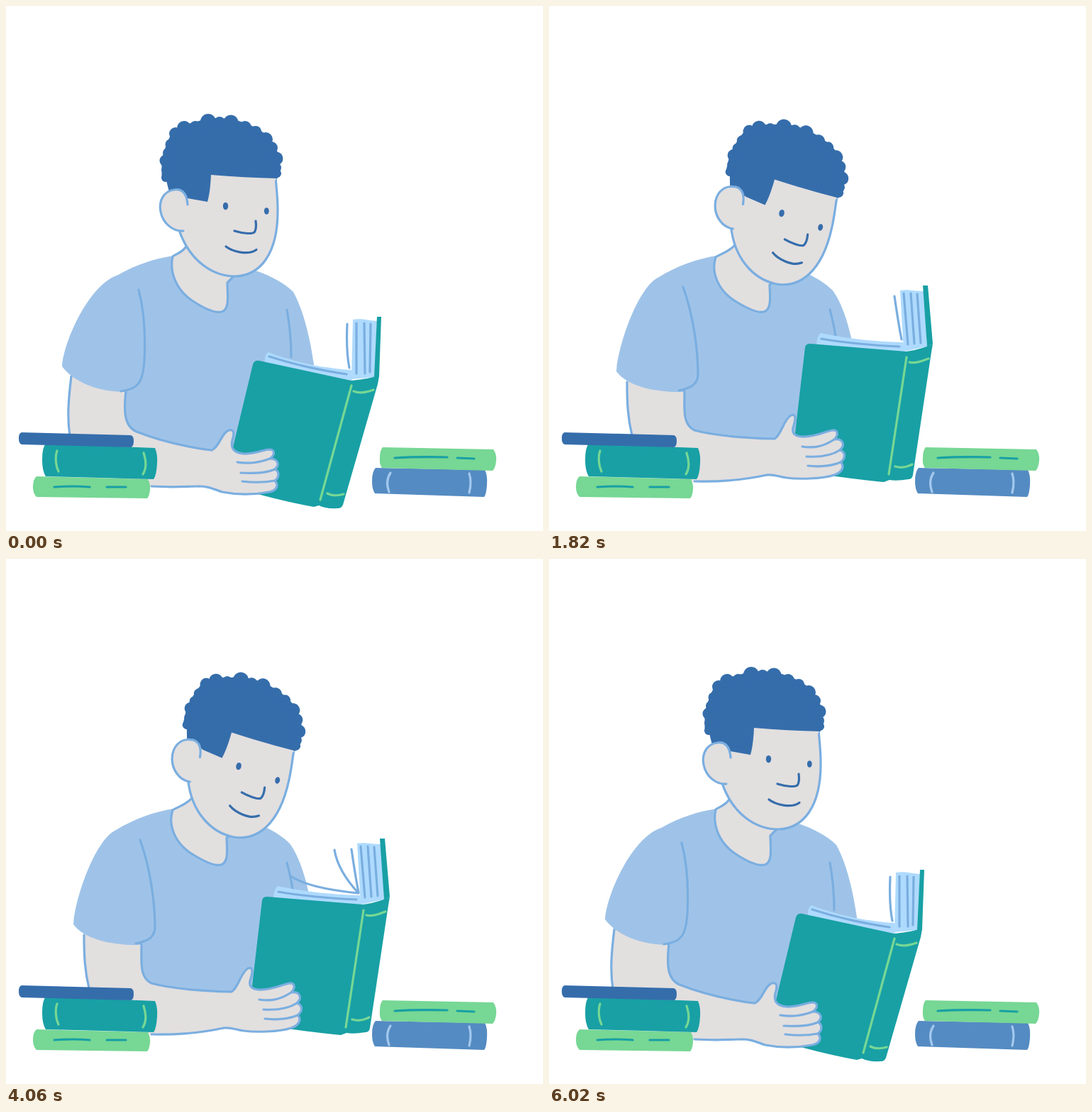
Animation of 757 by 740 pixels, one loop 6300 ms. Source, as an HTML page:

```html
<!DOCTYPE html>
<html lang="en">
<head>
<meta charset="utf-8">
<title>Reader</title>
<style>
html, body { margin: 0; width: 100%; height: 100%; overflow: hidden; background: #fff; }
svg { display: block; width: 757px; height: 740px; fill: none; stroke-width: 3.2; stroke-linecap: round; stroke-linejoin: round; }
.skin { fill: #e2dfdf; }
.shirt { fill: #9fc3e8; }
.hair { fill: #356dab; }
.teal { fill: #18a0a5; }
.green { fill: #77d794; }
.blue { fill: #548bc2; }
.page { fill: #aedafd; }
.line { stroke: #7aaee0; }
.dark { stroke: #356dab; }
.tealLine { stroke: #18a0a5; }
.greenLine { stroke: #77d794; }
.paleLine { stroke: #a3c8ee; }
</style>
</head>
<body>
<!-- d is the upright pose, data-to the leaning pose -->
<svg viewBox="0 0 757 740">
  <g id="arm">
    <path class="skin" d="M92 520C88 555 86 580 92 615C110 650 150 674 212 677C240 679 255 677 272 677L310 685L325 610L180 520Z"
      data-to="M110 526C110 560 110 580 117 605C130 650 170 670 212 670C245 671 275 668 307 661L340 663L345 596L200 520Z"/>
    <path class="line" d="M92 522C88 555 86 580 90 606M205 677C240 679 255 677 272 677"
      data-to="M110 530C110 560 111 580 117 605M205 670C245 671 275 668 307 661"/>
  </g>
  <g id="shirt">
    <path class="shirt" d="M236 352C210 356 184 364 158 379C118 392 82 470 79 508C95 530 130 544 168 544C166 570 166 592 184 600C220 614 262 623 300 627L400 620L434 505C429 470 420 430 405 403C392 390 372 380 355 374Z"
      data-to="M236 352C210 356 181 366 155 382C125 396 97 480 95 515C110 536 150 545 190 544C191 568 188 590 205 598C235 606 275 609 318 610L400 600L427 472C420 440 412 418 400 401C390 391 378 384 366 378Z"/>
    <path class="line" d="M187 400C195 430 197 460 195 500C193 530 187 540 162 543M169 543C166 570 166 592 184 600C220 614 262 623 297 627M396 428C400 450 402 475 402 495"
      data-to="M189 396C205 440 210 490 210 520C209 532 203 538 183 542M191 543C191 568 188 590 205 598C235 606 275 609 318 610M396 428C399 440 403 455 404 467"/>
    <path class="skin line" d="M254 339C248 348 240 349 235 353C230 375 240 400 262 415C280 427 295 433 304 431C316 428 312 405 312 390L320 382"
      data-to="M262 337C252 348 242 349 235 354C228 375 238 400 261 415C280 427 295 433 303 431C315 428 311 405 311 393L319 387"/>
  </g>
  <g id="head">
    <path class="skin line" d="M244 316C259 360 292 381 323 381C358 380 384 350 383 285C383 270 381 255 380 240"/>
    <path class="skin" d="M244 316L320 345L381 243L290 230L250 255Z"/>
    <g id="hair" class="hair"></g>
    <path id="ear" class="skin line" d="M256 280C255 262 246 257 237 259C222 261 215 275 218 290C221 306 235 318 250 317"/>
    <g class="hair">
      <ellipse cx="309.5" cy="282" rx="3.7" ry="5.2"/>
      <ellipse cx="367.3" cy="289" rx="3.4" ry="4.8"/>
    </g>
    <path class="dark" d="M322 317C332 320 346 322 350 319C353 315 353 310 352 303M310 339C319 346 341 352 353 343.5"/>
  </g>
  <g id="book">
    <path class="page" d="M489 442C500 440 510 443 523 444L520 523L487 526Z"
      data-to="M495 401C505 399 515 402 529 402L533 480L500 487Z"/>
    <path class="page" d="M370 488C400 500 440 510 487 513L488 528L365 503Q364 492 370 488"
      data-to="M383 461C420 469 460 473 499 474L502 488L377 479Q377 466 383 461"/>
    <path class="teal" d="M523 438L529 438L526 522L519 523Z"
      data-to="M527 394L534 394L541 476L533 480Z"/>
    <path class="teal" d="M348 505Q350 499 357 500L487 528Q510 526 524 521L526 522L524 533L475 703Q473 708 468 708Q450 709 441 704L434 706Q400 700 355 688L318 630Z"
      data-to="M361 481Q362 476 368 476L503 487Q525 484 539 477L541 476L539 488L513 661Q512 667 507 667Q490 670 480 668L472 671Q440 668 390 661L346 610Z"/>
    <path class="line" d="M494 447L494 518M505 447L506 518M514 448L513 516M371 494Q420 510 480 519M481 448C480 470 481 495 484 510"
      data-to="M500 405L506 477M510 405L515 476M519 406L524 475M384 469Q430 477 494 480M487 409C490 430 494 455 497 470"/>
    <path class="greenLine" d="M487 535L443 696M490 543C500 547 510 544 518 541M453 687C460 691 470 690 476 688"
      data-to="M504 495L479 660M508 502C518 504 527 500 535 497M488 649C498 652 505 650 512 646"/>
    <path id="turn" class="line" d=""/>
  </g>
  <g id="hand">
    <path class="skin line" d="M292 625C302 618 304 602 314 598C322 596 322 603 319 612C316 624 322 630 335 631C350 632 361 626 371 625C379 625 380 632 372 638C381 638 388 645 379 653C386 656 385 665 379 669C385 675 382 683 371 685C350 689 325 689 305 685C290 680 285 677 272 677"
      data-to="M318 610C328 604 330 584 341 577C348 574 348 582 345 591C341 602 346 606 356 607C376 608 388 600 399 598C407 597 409 604 402 611C413 609 419 618 410 626C419 629 418 638 411 643C418 649 412 658 402 661C385 667 350 667 335 665C322 663 318 660 307 661"/>
    <path class="line" d="M326 643C345 646 358 643 372 638M331 658C350 659 368 658 379 653M333 670C350 672 368 671 379 669"
      data-to="M357 621C375 624 388 620 402 611M363 635C380 636 398 634 410 626M365 648C382 650 400 648 411 643"/>
  </g>
  <g id="stacks">
    <path class="green" d="M43 663L200 667Q204 674 203 682Q202 691 199 694L43 692Q38 687 38 678Q38 667 43 663"/>
    <path class="teal" d="M56 617L210 623Q214 632 213 645Q212 662 208 667L56 663Q51 655 51 640Q51 622 56 617"/>
    <path class="hair" d="M22 601L176 605Q180 606 180 613Q180 621 176 622L22 618Q18 617 18 609Q18 602 22 601"/>
    <path class="blue" d="M521 651L675 654Q679 661 678 675Q677 689 674 692L520 687Q516 681 516 670Q516 656 521 651"/>
    <path class="green" d="M531 622L687 625Q692 632 691 641Q690 651 686 655L530 651Q526 646 527 637Q527 626 531 622"/>
    <path class="tealLine" d="M68 678Q95 676 118 678M142 678H169M548 637Q580 635 622 636M636 637L660 638"/>
    <path class="greenLine" d="M72 627C69 635 70 648 74 656M194 630C198 642 198 652 193 660"/>
    <path class="paleLine" d="M542 658C536 667 537 677 540 685M653 659C656 668 655 678 653 686"/>
  </g>
</svg>
<script>
const $ = id => document.getElementById(id);
const STEP = 70, CYCLE = 3150;

// Hair: a bump at each point, joined by one solid shape and a thick rim.
const bumps = [
  [225, 242, 6], [225, 231, 6], [225, 218, 8.5], [228, 207, 7], [232, 195, 7.5], [239, 180, 9],
  [251, 172, 10], [267, 170, 8], [285, 163, 11], [301, 164, 8], [317, 164, 10.5], [337, 171, 9],
  [352, 177, 8], [366, 188, 10], [374, 200, 9], [381, 215, 9.5], [380, 228, 8], [382, 236, 6]
];
const crown = 'M' + bumps.map(([x, y]) => x + ' ' + y).join('L');
$('hair').innerHTML =
  `<path d="${crown}L383 243Q335 242 289 238Q288 262 284 276L256 271L230 262Z"/>` +
  `<path class="dark" fill="none" stroke-width="11" d="${crown}"/>` +
  bumps.map(([x, y, r]) => `<circle cx="${x}" cy="${y}" r="${r}"/>`).join('');

const mix = (a, b, u) => a + (b - a) * u;
const ease = (t, start, length) => {
  const u = Math.min(1, Math.max(0, (t - start) / length));
  return u * u * (3 - 2 * u);
};

const morphs = [...document.querySelectorAll('[data-to]')].map(el => ({
  el, from: el.getAttribute('d'), to: el.dataset.to.match(/[\d.]+/g).map(Number)
}));

function pose(p) {
  for (const { el, from, to } of morphs) {
    let i = 0;
    el.setAttribute('d', from.replace(/[\d.]+/g, n => mix(+n, to[i++], p).toFixed(2)));
  }
}

// One loose page, u = 0 near the back cover, 1 nearly flat on the left.
function sheet(u) {
  if (u < 0 || u > 1) return '';
  const arc = (a, b, c) => mix(mix(a, b, u), mix(b, c, u), u);
  return `M497 471Q${mix(468, 425, u)} ${mix(440, 464, u)} ${arc(463, 415, 400)} ${arc(410, 405, 446)}`;
}

function draw(now) {
  const t = Math.floor(now / STEP) * STEP % CYCLE;
  const body = ease(t, 0, 330) - ease(t, 2520, 280);
  const head = ease(t, 0, 520) - ease(t, 2520, 350);
  pose(body);
  $('head').setAttribute('transform', `rotate(${13.1 * head} 275 367.6)`);
  $('ear').setAttribute('transform', `translate(${-2.5 * head} ${2 * head})`);
  $('turn').setAttribute('d', [770, 910, 1470, 1610].map(start => sheet((t - start) / 140)).join(''));
}

const begin = performance.now();
function tick() {
  draw(performance.now() - begin);
  requestAnimationFrame(tick);
}
tick();
</script>
</body>
</html>
```
